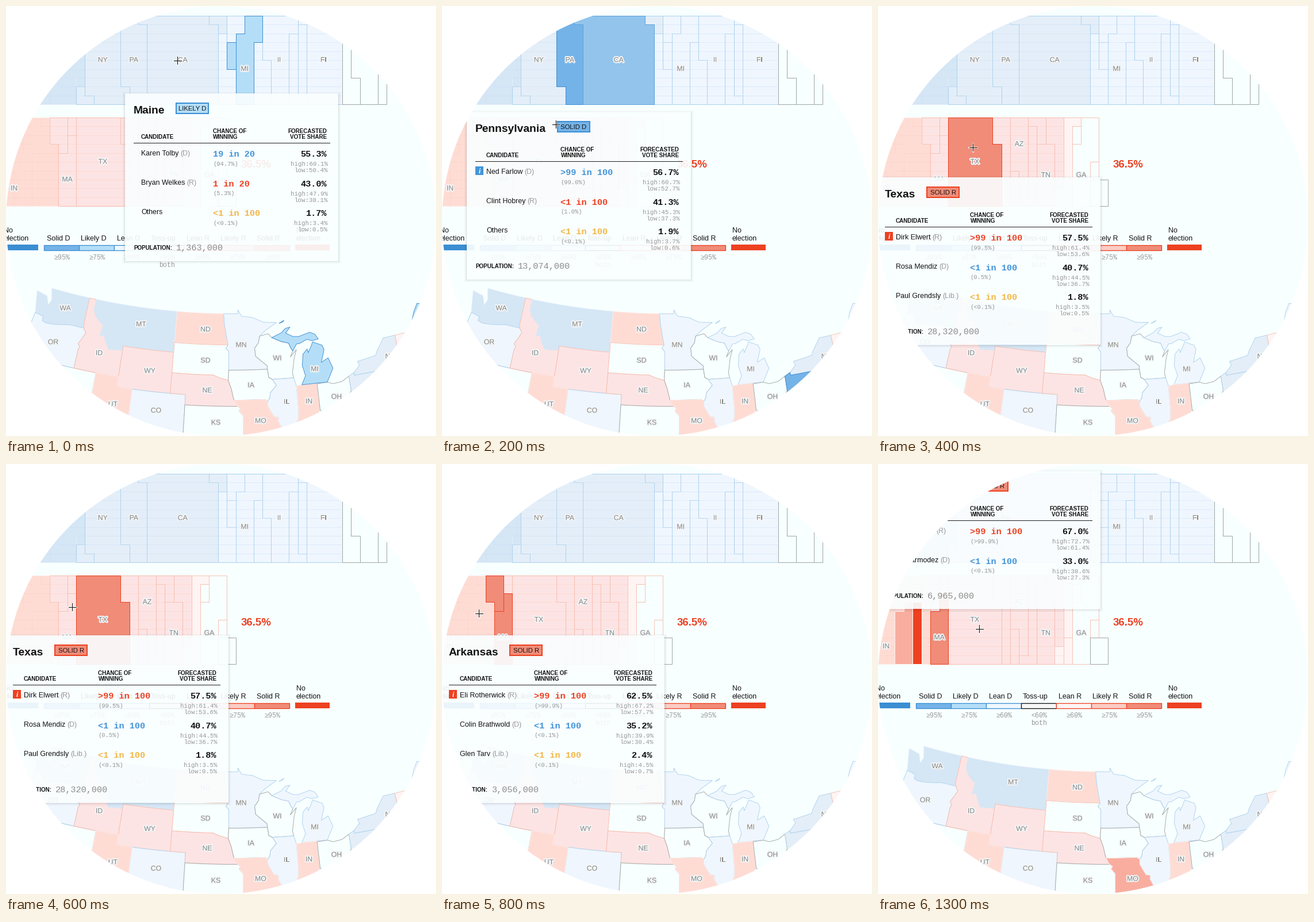
Write a matplotlib script that moves like this. It is 748 by 748 pixels and loops after 1400 ms.

```python
import matplotlib.pyplot as plt
import matplotlib.patheffects as pe
from matplotlib.animation import FuncAnimation
from matplotlib.collections import LineCollection
from matplotlib.colors import to_rgb
from matplotlib.patches import Circle, Polygon, Rectangle
import numpy as np

SIZE, DPI, FRAMES = 748, 64, 14
PX = 72 / DPI
CELL, ROWS, GRID_X = 15.43, 10, 122
SANS, MONO = "Liberation Sans", "Liberation Mono"
BG, BLUE, RED, YELLOW, GRAY = "#f8ffff", "#3b8ed2", "#ed4122", "#f2b84a", "#999999"

# fill, dimmed fill, line, dimmed line
STYLES = {
    "no_d": (BLUE, "#d5e6f5", "#ffffff", "#e2eefa"),
    "solid_d": ("#74b3e8", "#e4eef8", BLUE, "#acd2ee"),
    "likely_d": ("#b4def8", "#eff6fe", BLUE, "#acd2ee"),
    "lean_d": ("#eff8ff", BG, BLUE, "#acd2ee"),
    "toss": ("#f7f7f7", BG, "#111111", "#a0a6a6"),
    "lean_r": ("#fff5f5", BG, RED, "#f5c3b6"),
    "likely_r": ("#fbccc4", "#fef4f3", RED, "#f5c3b6"),
    "solid_r": ("#f08c78", "#fde4e4", RED, "#f5bdae"),
    "no_r": (RED, "#fedcd4", "#ffffff", "#feece8"),
}

fig = plt.figure(figsize=(SIZE / DPI, SIZE / DPI), dpi=DPI, facecolor=BG)
ax = fig.add_axes([0, 0, 1, 1])
ax.set(xlim=(0, SIZE), ylim=(SIZE, 0))
ax.axis("off")
regions = []


def text(x, y, s, size, color="#111111", font=SANS, bold=False, ha="left", z=8, **kw):
    """Place text with its capitals centred on y."""
    return ax.text(x, y + 0.35 * size, s, fontsize=size * PX, color=color, family=font,
                   weight="bold" if bold else "normal", ha=ha, va="baseline", zorder=z, **kw)


def rect(x0, y0, x1, y1, fill, line="none", lw=0, z=7, **kw):
    return ax.add_patch(Rectangle((x0, y0), x1 - x0, y1 - y0, facecolor=fill,
                                  edgecolor=line, lw=lw * PX, zorder=z, **kw))


def region(name, style, points, lw=1.0):
    patch = ax.add_patch(Polygon(points, closed=True, lw=lw * PX, joinstyle="round"))
    regions.append((name, style, patch))


def tag(name, x, y):
    t = text(x, y, name, 12.3, "#858585", ha="center", z=5)
    t.set_path_effects([pe.withStroke(linewidth=4 * PX, foreground="#f3f5f6")])


# Population charts: cells fill the columns like a snake, even ones down, odd ones up
def block(name, style, start, count, first_col, top):
    columns = {}
    for k in range(start, start + count):
        col, row = first_col + k // ROWS, k % ROWS
        columns.setdefault(col, []).append(ROWS - 1 - row if col % 2 else row)
    spans = {c: (min(r), max(r) + 1) for c, r in columns.items()}
    upper = [(c + e, spans[c][0]) for c in spans for e in (0, 1)]
    lower = [(c + e, spans[c][1]) for c in spans for e in (0, 1)]
    to_px = lambda i, j: (GRID_X + CELL * i, top + CELL * j)
    region(name, style, [to_px(*p) for p in upper + lower[::-1]])
    if len(name) == 2 and count > 9:
        wide = [c for c in spans if len(columns[c]) >= min(6, 0.27 * count)]
        low, high = 0, ROWS
        if len(wide) < 3:
            low, high = max(spans[c][0] for c in wide), min(spans[c][1] for c in wide)
        x, y = to_px((wide[0] + wide[-1] + 1) / 2, (low + high) / 2)
        tag(name, x, y - 1)


def chart(top, first_col, dense_end, right, line, groups):
    start = 0
    for style, states in groups:
        for item in states.split():
            name, count = item.split(":")
            block(name, style, start, int(count), first_col, top)
            start += int(count)
    x = lambda i: GRID_X + CELL * i
    rows = [[(x(first_col), top + CELL * j), (x(right), top + CELL * j)] for j in range(1, ROWS)]
    cols = [[(x(i), top), (x(i), top + CELL * ROWS)] for i in range(first_col, dense_end)]
    return ax.add_collection(LineCollection(rows + cols, colors=line, lw=0.8 * PX, alpha=0.55, zorder=2))


cells = [
    chart(17, -4, 0, 30, "#c6dff5", [
        ("no_d", ":12 :18 :3 :15"),
        ("solid_d", ":3 NY:41 PA:27 CA:80 :3"),
        ("likely_d", ":12 ME:3 :5 MI:21 :12 IL:27 :9 :8 FL:41"),
        ("toss", ":13 :27 :10")]),
    chart(194, -8, -2, 13, "#f9cdbf", [
        ("no_r", "IN:14 :10 MO_:13 :2 :4 slim:7 :7"),
        ("solid_r", "AR:7 MA:14 :2 TX:57 :13 :4 AZ:15 :10 :4 TN:14 :11"),
        ("likely_r", ":2 :3 :8"),
        ("lean_r", ":2 GA:22 :2"),
        ("toss", ":6")]),
]


# Map: an Albers conic projection of longitude and latitude
def project(points):
    lon, lat = np.radians(np.array(points, float).T)
    s1, s2 = np.sin(np.radians([29.5, 45.5]))
    n = (s1 + s2) / 2
    rho = np.sqrt(1 - s1 ** 2 + 2 * n * s1 - 2 * n * np.sin(lat)) / n
    angle = n * (lon + np.radians(96))
    return np.column_stack([393.2 + 1024 * rho * np.sin(angle), 1024 * rho * np.cos(angle) - 593])


def state(name, style, label, *points):
    ends = np.array(points, float)
    steps = np.linspace(0, 1, 6, endpoint=False)[:, None]
    edges = [a + (b - a) * steps for a, b in zip(ends, np.roll(ends, -1, axis=0))]
    region(name, style, project(np.vstack(edges)), 0.9)
    if label:
        tag(name, *label)


def box(west, south, east, north):
    return (west, north), (east, north), (east, south), (west, south)


# Borders that neighbours share
COLUMBIA = [(-124.05, 46.27), (-123.4, 46.2), (-122.8, 46.1), (-122.8, 45.7), (-122.2, 45.57),
            (-121.1, 45.65), (-119.3, 45.93), (-118.98, 46), (-116.92, 46)]
SNAKE = [(-116.92, 46), (-116.47, 45.6), (-116.85, 44.95), (-117.2, 44.4), (-116.9, 44.15),
         (-117.03, 43.8), (-117.03, 42)]
BITTERROOT = [(-116.05, 49), (-116.05, 48), (-115.7, 47.45), (-114.9, 46.9), (-114.35, 46.65),
              (-114.5, 45.55), (-113.95, 45.7), (-113.45, 44.95), (-113, 44.45), (-111.5, 44.55), (-111.05, 44.5)]
RED_RIVER = [(-97.23, 49), (-97.1, 48), (-96.85, 47), (-96.56, 45.94)]
BIG_STONE = [(-96.56, 45.94), (-96.85, 45.6), (-96.45, 45.3), (-96.45, 43.5)]
NIOBRARA = [(-96.5, 42.5), (-97.9, 42.8), (-98.5, 43), (-104.05, 43)]
MISSOURI = [(-96.5, 42.5), (-96.1, 41.7), (-95.85, 40.9), (-95.75, 40.6), (-95.3, 40)]
KANSAS = [(-95.3, 40), (-94.9, 39.8), (-95.1, 39.55), (-94.6, 39.1), (-94.62, 37)]
ST_CROIX = [(-92.1, 46.75), (-92.3, 46.1), (-92.85, 45.6), (-92.75, 44.8), (-91.25, 43.85), (-91.22, 43.5)]
UPPER_MISS = [(-91.22, 43.5), (-91.1, 42.7), (-90.64, 42.5)]
MID_MISS = [(-90.64, 42.5), (-90.15, 41.9), (-91, 41.2), (-91.1, 40.7), (-91.4, 40.4)]
LOWER_MISS = [(-91.4, 40.4), (-91.4, 39.9), (-90.7, 38.9), (-90.15, 38.8), (-90.2, 38.4), (-89.5, 37.3), (-89.15, 37)]
MENOMINEE = [(-90.4, 46.55), (-89.1, 46.1), (-88.1, 45.9), (-87.8, 45.35), (-87.6, 45.1)]
WABASH = [(-87.53, 41.7), (-87.53, 39.4), (-87.6, 38.7), (-88, 37.9)]

state("NV", "toss", None, (-120, 42), (-114.05, 42), (-114.05, 37), (-120, 39))
state("WA", "no_d", (103, 525), (-124.7, 48.38), (-123.1, 48.15), (-122.6, 47.3), (-122.3, 47.9),
      (-122.75, 49), (-117.03, 49), (-117.03, 46.4), *COLUMBIA[::-1])
state("OR", "likely_d", (82, 584), *COLUMBIA, *SNAKE, (-124.2, 42), (-124.5, 42.8))
state("ID", "solid_r", (162, 603), (-117.03, 49), *BITTERROOT, (-111.05, 42), *SNAKE[::-1], (-117.03, 46.4))
state("MT", "no_d", (235, 553), *BITTERROOT, (-111.05, 45), (-104.05, 45), (-104.05, 49))
state("WY", "solid_r", (250, 634), *box(-111.05, 41, -104.05, 45))
state("CO", "likely_d", (261, 703), *box(-109.05, 37, -102.05, 41))
state("UT", "no_r", (186, 692), (-114.05, 42), (-111.05, 42), (-111.05, 41), *box(-114.05, 37, -109.05, 41)[1:])
state("ND", "no_r", (347, 562), (-104.05, 49), *RED_RIVER, (-104.05, 45.94))
state("SD", "lean_r", (347, 616), (-104.05, 45.94), *BIG_STONE, *NIOBRARA)
state("NE", "solid_r", (350, 668), *NIOBRARA[::-1], *MISSOURI, (-102.05, 40), (-102.05, 41), (-104.05, 41))
state("KS", "toss", (365, 724), (-102.05, 40), *KANSAS, (-102.05, 37))
state("MN", "likely_d", (409, 589), *BIG_STONE[::-1], *RED_RIVER[::-1], (-95.15, 49), (-95.15, 49.38),
      (-94.6, 48.75), (-93, 48.6), (-91.5, 48.1), (-89.6, 48), (-91.3, 47.25), *ST_CROIX)
state("IA", "toss", (426, 659), (-96.45, 43.5), *UPPER_MISS, *MID_MISS, (-91.75, 40.6), *MISSOURI[3::-1])
state("WI", "toss", (472, 612), *ST_CROIX[::-1], (-90.9, 46.95), *MENOMINEE, (-88, 44.55), (-87.1, 45.2),
      (-87.5, 44.4), (-87.9, 43), (-87.8, 42.5), *UPPER_MISS[::-1])
state("MI", "likely_d", None, *MENOMINEE[::-1], (-89, 46.95), (-88.4, 47.35), (-87.7, 47.45), (-88.4, 46.9),
      (-87.4, 46.5), (-86.6, 46.45), (-85, 46.75), (-84.3, 46.5), (-83.9, 46), (-84.8, 45.9),
      (-85.5, 46.1), (-86.6, 45.75), (-87, 45.75))
state("MI", "likely_d", None, (-89.2, 47.9), (-88.5, 48.15), (-88.7, 48))
state("MI", "likely_d", (537, 631), (-86.8, 41.76), (-86.2, 42.6), (-86.5, 43.6), (-86.25, 44.7), (-85.6, 45.15),
      (-85.5, 44.8), (-85, 45.4), (-84.75, 45.78), (-83.5, 45.35), (-83.3, 44.9), (-83.9, 43.7),
      (-82.9, 44.05), (-82.45, 43), (-83.45, 41.73), (-84.8, 41.76))
state("IL", "likely_d", (488, 688), (-87.8, 42.5), *WABASH, (-88.5, 37.1), *LOWER_MISS[::-1], *MID_MISS[::-1])
state("IN", "no_r", (527, 687), (-86.8, 41.76), (-84.8, 41.76), (-84.8, 39.1), (-86.5, 38), *WABASH[::-1])
state("OH", "toss", (575, 679), (-84.8, 41.7), (-83.45, 41.73), (-82.7, 41.5), (-81.5, 41.6), (-80.52, 42),
      (-80.52, 40.6), (-81.7, 39.2), (-82.6, 38.45), (-84.8, 39.1))
state("MO", "no_r", (443, 721), *MISSOURI[:2:-1], (-95.75, 40.6), (-91.75, 40.6), *LOWER_MISS,
      (-89.5, 36.5), (-94.62, 36.5), *KANSAS[::-1])
state("PA", "solid_d", None, (-80.52, 42), (-79.76, 42.27), (-79.76, 42), (-75.35, 42), (-74.7, 41.4),
      (-75.2, 40), (-80.52, 39.72))
state("NY", "solid_d", (668, 609), (-79.76, 42), (-79.76, 42.27), (-78.9, 42.85), (-79.05, 43.27), (-76.5, 43.5),
      (-76.2, 43.9), (-75, 45), (-73.35, 45), (-73.5, 42), (-74.7, 41.4), (-75.35, 42))
state("VT", "likely_r", None, (-73.35, 45), (-71.5, 45), (-72.5, 42.73), (-73.4, 42.75))
state("ME", "likely_d", None, (-71, 45.3), (-70, 46.7), (-69.2, 47.45), (-67.8, 47.05), (-67, 44.8), (-70.7, 43.1))

# Legend
text(409, 274, "36.5%", 18.6, RED, bold=True)
for x0, x1, label_x, fill in [(-10, 56, -4, BLUE), (503, 563, 505, RED)]:
    rect(x0, 415, x1, 425, fill)
    text(label_x, 389.5, "No", 12.5)
    text(label_x, 403.5, "election", 12.5)
for k, name in enumerate(["Solid D", "Likely D", "Lean D", "Toss-up", "Lean R", "Likely R", "Solid R"]):
    x = 66.5 + 60.9 * k
    fill, _, line, _ = STYLES[name.lower().replace(" ", "_").replace("-up", "")]
    rect(x, 416, x + 60.9, 424.5, fill, line, 1.3)
    text(x + 24.5, 403.5, name, 12.5, ha="center")
    odds = ("≥95%", "≥75%", "≥60%", "<60%")[3 - abs(3 - k) if k != 3 else 3]
    text(x + 31, 436.5, odds, 11.6, GRAY, MONO, ha="center")
text(280, 450, "both", 11.6, GRAY, MONO, ha="center")

# Round window
ax.add_patch(Circle((374, 374), 574, fill=False, edgecolor="white", lw=400 * PX, zorder=30))

# title, rating, incumbent badge, population, rows of (name, party, odds, share, high, low)
TIPS = {
    "ME": ("Maine", "LIKELY D", False, 1363000, [
        ("Karen Tolby", "D", 94.7, 55.3, 60.1, 50.4),
        ("Bryan Welkes", "R", 5.3, 43.0, 47.9, 38.1),
        ("Others", "", 0, 1.7, 3.4, 0.5)]),
    "CA": ("California", "SOLID D", False, 39776000, [
        ("Dean Novark", "D", 100, 59.6, 64.1, 55.0),
        ("Jon Costrel", "R", 0, 40.4, 45.0, 35.9)]),
    "PA": ("Pennsylvania", "SOLID D", True, 13074000, [
        ("Ned Farlow", "D", 99.0, 56.7, 60.7, 52.7),
        ("Clint Hobrey", "R", 1.0, 41.3, 45.3, 37.3),
        ("Others", "", 0, 1.9, 3.7, 0.6)]),
    "TX": ("Texas", "SOLID R", True, 28320000, [
        ("Dirk Elwert", "R", 99.5, 57.5, 61.4, 53.6),
        ("Rosa Mendiz", "D", 0.5, 40.7, 44.5, 36.7),
        ("Paul Grendsly", "Lib.", 0, 1.8, 3.5, 0.5)]),
    "AR": ("Arkansas", "SOLID R", True, 3056000, [
        ("Eli Rotherwick", "R", 100, 62.5, 67.2, 57.7),
        ("Colin Brathwold", "D", 0, 35.2, 39.9, 30.4),
        ("Glen Tarv", "Lib.", 0, 2.4, 4.5, 0.7)]),
    "MA": ("Massachusetts", "SOLID R", True, 6965000, [
        ("Walter Dosk", "R", 100, 67.0, 72.7, 61.4),
        ("Ivo Tarmodez", "D", 0, 33.0, 38.6, 27.3)]),
    "MO": ("Missouri", "", True, 6217000, [("Gov. Hugh Dalvin", "R")]),
}
PARTY = {"D": "#4495da", "R": RED}

# First frame of each scene: tooltip state, its left and top, how strongly regions are lit
SCENES = {
    0: ("ME", 207, 152, {"MI": 1, "ME": 1}),
    1: ("CA", 120, 168, {"CA": 1}),
    2: ("PA", 43, 184, {"PA": 1, "CA": 0.72}),
    3: None,
    4: ("TX", -3, 298, {"TX": 1}),
    7: ("MA", -3, 298, {"MA": 1, "TX": 0.4}),
    8: ("AR", -3, 298, {"AR": 1, "MA": 1}),
    9: ("MO", -3, 112, {"MO": 1}),
    12: ("MA", -3, 12, {"MA": 1, "slim": 1, "MO": 0.3}),
}
CURSOR = np.array([(0, 298, 94), (2, 198, 205), (3, 190, 244), (6, 115, 248),
                   (8, 64, 259), (10, 44, 268), (13, 176, 286)]).T


def mix(a, b, t):
    return tuple(np.array(to_rgb(a)) * (1 - t) + np.array(to_rgb(b)) * t)


def right_edge(t):
    return t.get_window_extent().x1


def chance_label(odds):
    if odds >= 99:
        return ">99 in 100"
    return "<1 in 100" if odds <= 1 else f"{round(odds / 5)} in 20"


def odds_label(odds):
    return {100: "(>99.9%)", 0: "(<0.1%)"}.get(odds, f"({odds}%)")


def panel(x, y, w, h):
    for k in range(1, 5):
        rect(x - k + 0.5, y - k + 2, x + w + k - 0.5, y + h + k, "none", "black", 1, 9, alpha=0.11 / k)
    rect(x, y, x + w, y + h, "#fafeff", z=10, alpha=0.92)


def candidate(x, y, name, party):
    t = text(x, y, name, 12.4, z=20)
    if party:
        text(right_edge(t) + 3, y, f"({party})", 12.4, GRAY, z=20)


def tooltip(key, x, y):
    title, rating, badge, population, rows = TIPS[key]
    small = not rating
    w = 192 if small else 390 if badge else 371
    h = 124 if small else 137 + 51.3 * len(rows)
    name_x, chance_x, share_x = (34, 163.5, 369) if badge else (28, 153, 351)
    panel(x, y, w, h)
    heading = text(x + 15, y + 28, title, 19.2, bold=True, z=20)
    text(x + 15, y + h - 22, "POPULATION:", 9.9, bold=True, z=20)
    text(x + 89, y + h - 23, f"{population:,}", 15.3, "#8c8c8c", MONO, z=20)
    if small:
        candidate(x + name_x, y + 65, *rows[0])
        return

    fill, _, line, _ = STYLES[rating.lower().replace(" ", "_")]
    left = right_edge(heading) + 20
    rect(left, y + 17, left + 56, y + 34.5, fill, line, 2, 19)
    text(left + 28, y + 26, rating, 11.4, ha="center", z=20)
    for dx, ha, lines in [(name_x, "left", ["", "CANDIDATE"]), (chance_x, "left", ["CHANCE OF", "WINNING"]),
                          (share_x, "right", ["FORECASTED", "VOTE SHARE"])]:
        for k, s in enumerate(lines):
            text(x + dx, y + 66 + 10 * k, s, 9.9, bold=True, ha=ha, z=20)
    ax.plot([x + 15, x + w - 15], [y + 86.4, y + 86.4], color="#222222", lw=PX, zorder=20)

    for r, (name, party, odds, share, high, low) in enumerate(rows):
        top = y + 104 + 51.3 * r
        color = PARTY.get(party, YELLOW)
        if badge and r == 0:
            rect(x + 15, top - 9, x + 29.5, top + 6, color, z=19)
            text(x + 22, top - 1, "i", 12, "white", "Liberation Serif", True, "center", 20, style="italic")
        candidate(x + name_x, top - 0.5, name, party)
        text(x + chance_x, top + 1, chance_label(odds), 15.3, color, MONO, True, z=20)
        text(x + chance_x, top + 18.5, odds_label(odds), 10.5, GRAY, MONO, z=20)
        text(x + share_x, top + 1, f"{share}%", 15.3, font=MONO, bold=True, ha="right", z=20)
        for k, s in enumerate([f"high:{high}%", f"low:{low}%"]):
            text(x + share_x + 2, top + 18.5 + 11 * k, s, 10.8, GRAY, MONO, ha="right", z=20)


def cursor(frame):
    x, y = (round(np.interp(frame, CURSOR[0], axis)) + 0.5 for axis in CURSOR[1:])
    for color, lw, reach in [("white", 2.6, 7), ("#111111", 1.1, 6.5)]:
        ax.plot([x - reach, x + reach], [y, y], color=color, lw=lw * PX, zorder=25)
        ax.plot([x, x], [y - reach, y + reach], color=color, lw=lw * PX, zorder=25)


fixed = set(ax.get_children())


def draw(frame):
    for artist in ax.get_children():
        if artist not in fixed:
            artist.remove()
    scene = SCENES[max(start for start in SCENES if start <= frame)]
    for name, style, patch in regions:
        fill, dim_fill, line, dim_line = STYLES[style]
        level = scene[3].get(name.strip("_"), 0) if scene else 1
        patch.set_facecolor(mix(dim_fill, fill, level))
        patch.set_edgecolor(mix(dim_line, line, level))
        patch.set_zorder(3 if scene and level else 1)
    for lines in cells:
        lines.set_visible(scene is not None)
    if scene:
        tooltip(*scene[:3])
    cursor(frame)
    return []


anim = FuncAnimation(fig, draw, frames=FRAMES, interval=100, repeat=True, repeat_delay=0,
                     init_func=lambda: [], blit=False)
plt.show()
```
